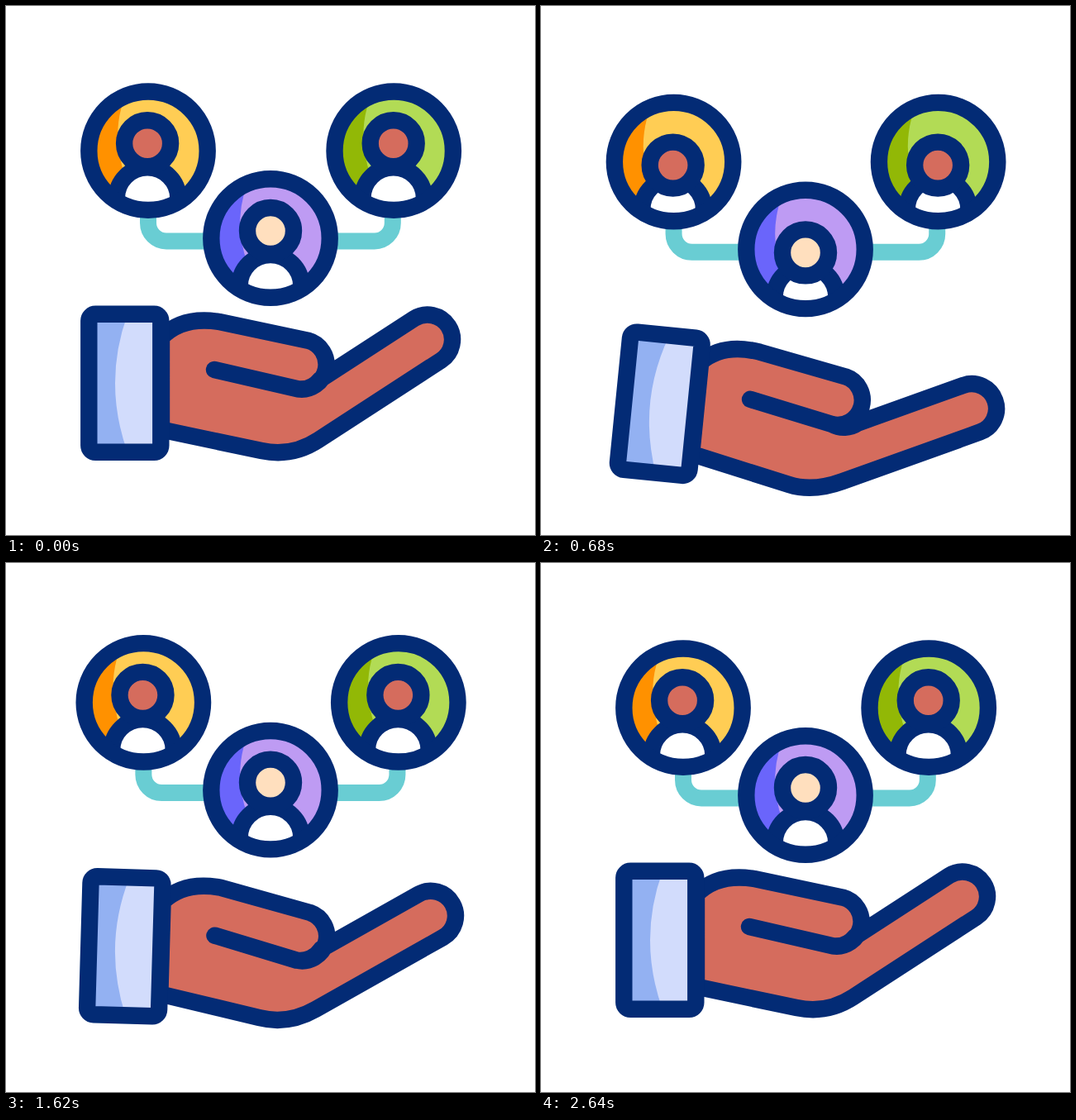
These frames come from a looping animation (640 px wide and 640 px high, 3040 ms). An HTML page:

```html
<!DOCTYPE html>
<html lang="en">
<head>
<meta charset="utf-8">
<title>Team in hand</title>
<style>
  html, body { margin: 0; width: 100%; height: 100%; overflow: hidden; background: #fff; }
  svg { display: block; width: 100vw; height: 100vh; }
  .line { stroke: #032b75; stroke-width: 20.4; stroke-linecap: round; stroke-linejoin: round; }
</style>
</head>
<body>
<svg viewBox="0 0 640 640">
  <clipPath id="disc"><circle r="66"/></clipPath>
  <g id="team">
    <path id="links" fill="none" stroke="#69cdd3" stroke-width="20"/>
  </g>
  <g id="hand">
    <path id="palm" class="line" fill="#d56c5d"/>
    <rect x="100.3" y="372.8" width="87" height="167" fill="#d2dcfc"/>
    <path d="M147 373Q117 456 147 540H100V373Z" fill="#93b1f2"/>
    <rect class="line" x="100.3" y="372.8" width="87" height="167" rx="8" fill="none"/>
  </g>
</svg>
<script>
const LOOP = 3040;
const $ = id => document.getElementById(id);

// Sine ease from one [time, value] pose to the next.
const ease = (...poses) => t => {
  const next = poses.findIndex(([time]) => time > t);
  if (next < 1) return poses.at(next)[1];
  const [t0, v0] = poses[next - 1], [t1, v1] = poses[next];
  return v0 + (v1 - v0) * (1 - Math.cos(Math.PI * (t - t0) / (t1 - t0))) / 2;
};

// Badges: draw in, fly apart, wait, come back; meanwhile they bob and the figures nod.
const spread = ease([0, 0], [350, -12], [1150, 52], [1330, 52], [1700, 0]);
const lift = ease([0, 0], [200, -7], [830, 16.5], [1295, 16.5], [1660, -7], [2070, 8], [2640, 0]);
const nod = ease([80, 0], [400, 13], [700, 13], [960, -2], [1150, 0]);

// Hand: sink, wait, rise, dip once more; the tilt and the finger follow a little later.
const sink = ease([0, 0], [960, 31], [1230, 31], [1760, 3], [2120, 15.5], [2540, 0]);
const tilt = ease([150, 0], [900, 7.1], [1210, 7.1], [1800, 0.2], [2140, 3.5], [2500, 0]);
const bend = ease([180, 0], [900, 9.6], [1260, 9.6], [1840, -1.6], [2160, 4], [2440, 0]);
// The thumb trails behind the tilt.
const thumbDrag = t => tilt(t - 75) - tilt(t + 75);

function badge(x, y, side, figureX, dark, light, face) {
  const g = document.createElementNS("http://www.w3.org/2000/svg", "g");
  g.innerHTML = `
    <g clip-path="url(#disc)">
      <circle r="66" fill="${light}"/>
      <path d="M-30 -70L-32.5 -52Q-43 -12 -28 30V70H-70V-70Z" fill="${dark}"/>
      <circle class="line" cx="${figureX}" cy="57.4" r="37.3" fill="#fff"/>
      <circle class="line head" cx="${figureX}" r="28" fill="${face}"/>
    </g>
    <circle class="line" r="71.7" fill="none"/>`;
  $("team").append(g);
  const head = g.querySelector(".head");
  return t => {
    g.setAttribute("transform", `translate(${x + side * spread(t)} ${y})`);
    head.setAttribute("cy", -9 + nod(side ? t - 250 : t));
  };
}

const badges = [
  badge(172, 175.2, -1, -0.9, "#ff9100", "#ffcd54", "#d56c5d"),
  badge(469.2, 175.2, 1, -0.5, "#92b806", "#b2db55", "#d56c5d"),
  badge(320, 281, 0, 0, "#6a65fb", "#be9bf3", "#ffdfbe")
];

// Returns a function that turns points about a joint.
function joint(cx, cy, degrees) {
  const a = degrees * Math.PI / 180, c = Math.cos(a), s = Math.sin(a);
  return (x, y) => {
    const dx = x - cx, dy = y - cy;
    return `${cx + dx * c - dy * s} ${cy + dx * s + dy * c}`;
  };
}

function palmPath(t) {
  const thumb = joint(252, 440, thumbDrag(t));
  const finger = joint(355, 488, bend(t));
  const thumbEnd = thumb(352.8, 463.3);
  return `M188 512.6V401Q213 375 258 382L${thumb(365.3, 404.7)}A30 30 0 0 1 ${thumbEnd}
    L252 440L${thumbEnd}A30 30 0 0 0 ${finger(380, 452)}L${finger(493.7, 378.3)}
    A30 30 0 0 1 ${finger(526.3, 428.7)}L${finger(378, 525)}Q${finger(346, 546)} 309 538Z`;
}

function draw(t) {
  const x = spread(t);
  $("team").setAttribute("transform", `translate(0 ${lift(t)})`);
  $("links").setAttribute("d", `M${172 - x} 220V262.4a22 22 0 0 0 22 22
    H${445.8 + x}a22 22 0 0 0 22 -22V220`);
  badges.forEach(update => update(t));
  $("hand").setAttribute("transform", `translate(0 ${sink(t)}) rotate(${tilt(t)} 143.6 456)`);
  $("palm").setAttribute("d", palmPath(t));
}

const start = performance.now();
function tick() {
  draw((performance.now() - start) % LOOP);
  requestAnimationFrame(tick);
}
tick();
</script>
</body>
</html>
```
